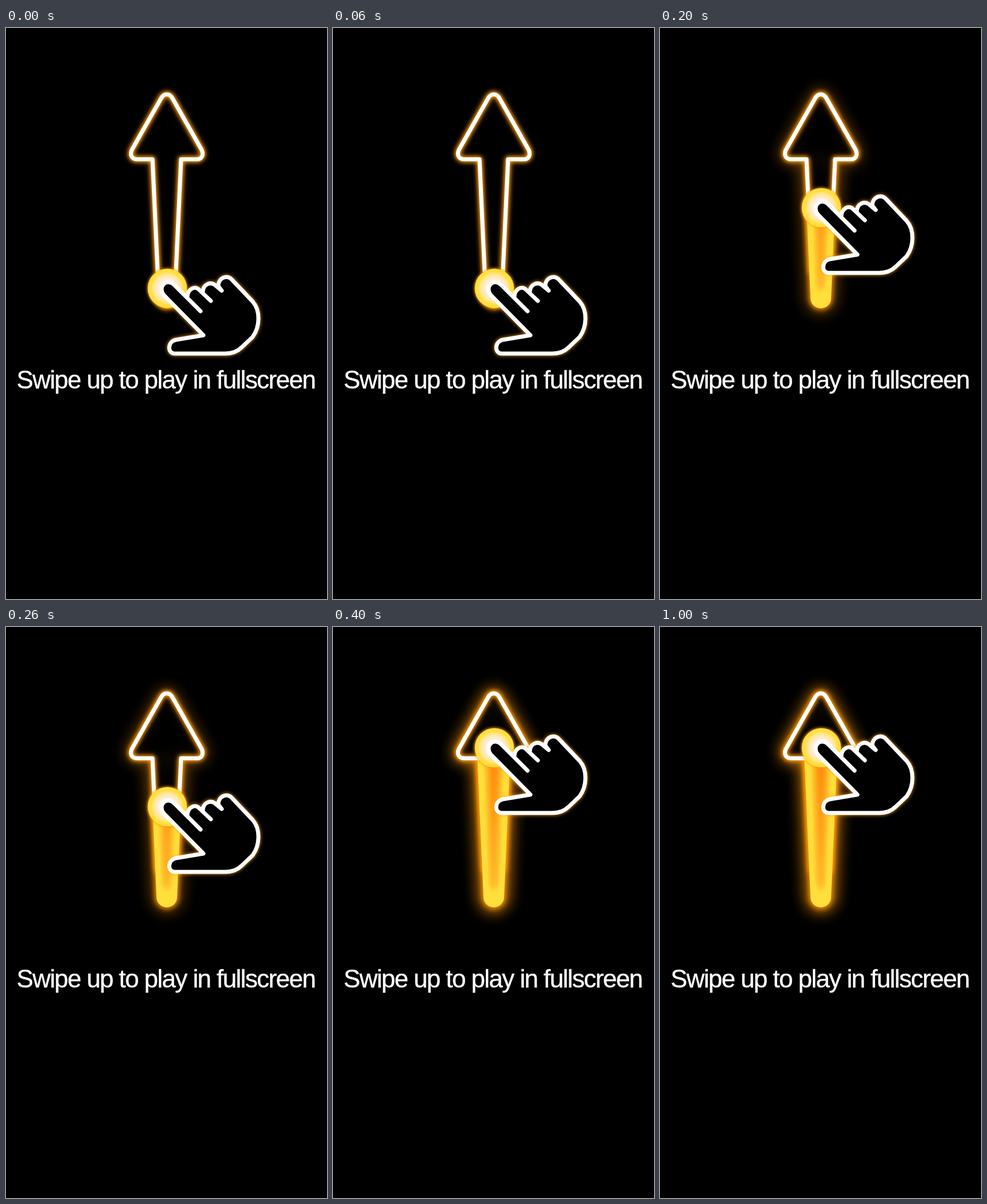
Write an HTML page that moves like this. It is 561 px wide and 998 px high and loops after 1.4 s.

```html
<!DOCTYPE html>
<html lang="en">
<head>
<meta charset="utf-8">
<title>Swipe up</title>
<style>
  html, body { margin: 0; width: 100%; height: 100%; overflow: hidden; background: #000; }
  svg { position: absolute; left: 0; top: 0; width: 561px; height: 998px; }
  path { stroke-linejoin: round; stroke-linecap: round; }
  .line { fill: none; stroke: #fff; stroke-width: 7; }
  .near { fill: none; stroke: #f90; stroke-width: 10; filter: url(#soft); opacity: .85; }
  .tight { fill: none; stroke: #ffa01a; stroke-width: 10; filter: url(#tight); opacity: .6; }
  text { font: 44px "Liberation Sans", Arial, sans-serif; letter-spacing: -1.6px; fill: #fff; stroke: #fff; stroke-width: .4; }

  .halo, .trail, .hand { animation: 1400ms step-end infinite; }
  .halo { animation-name: halo; }
  .trail { animation-name: trail; }
  .hand { animation-name: swipe; }

  @keyframes swipe {
    0% { transform: translateY(0); }
    7.14% { transform: translateY(-70px); }
    14.28% { transform: translateY(-141px); }
    21.42% { transform: translateY(-210px); }
    28.57%, 100% { transform: translateY(-244px); }
  }
  @keyframes trail {
    0% { clip-path: inset(470px 0 0); }
    7.14% { clip-path: inset(385px 0 0); }
    14.28% { clip-path: inset(314px 0 0); }
    21.42% { clip-path: inset(245px 0 0); }
    28.57%, 100% { clip-path: inset(233px 0 0); }
  }
  @keyframes halo {
    0% { opacity: 0; }
    7.14% { opacity: .28; }
    14.28% { opacity: .55; }
    21.42% { opacity: .8; }
    28.57%, 100% { opacity: 1; }
  }
</style>
</head>
<body>
<!-- arrow outline and text -->
<svg viewBox="0 0 561 998">
  <defs>
    <filter id="wide" filterUnits="userSpaceOnUse" x="0" y="0" width="561" height="998"><feGaussianBlur stdDeviation="12"/></filter>
    <filter id="soft" filterUnits="userSpaceOnUse" x="0" y="0" width="561" height="998"><feGaussianBlur stdDeviation="5"/></filter>
    <filter id="tight" filterUnits="userSpaceOnUse" x="0" y="0" width="561" height="998"><feGaussianBlur stdDeviation="2.5"/></filter>
    <path id="arrow" d="M297 425L306 229.5H334C342 229.5 346 222 342 213L291 123C286 113.5 276 113.5 271 123L220 213C216 222 220 229.5 229 229.5H256L265 425"/>
    <path id="stem" d="M252.5 231L263 472A18 18 0 0 0 299 472L309.5 231Z"/>
  </defs>
  <g class="halo">
    <g filter="url(#wide)" fill="none" stroke="#f90" stroke-width="20" opacity=".7">
      <use href="#arrow"/>
      <use href="#stem"/>
    </g>
    <use href="#arrow" fill="#000" opacity=".85"/>
  </g>
  <use href="#arrow" class="near"/>
  <use href="#arrow" class="tight"/>
  <use href="#arrow" class="line"/>
  <text x="18.5" y="630">Swipe up to play in fullscreen</text>
</svg>

<!-- filled stem, revealed below the finger -->
<svg class="trail" viewBox="0 0 561 998">
  <defs>
    <linearGradient id="core" gradientUnits="userSpaceOnUse" x1="0" y1="240" x2="0" y2="470">
      <stop stop-color="#ff8c0c"/>
      <stop offset=".5" stop-color="#ff9e18"/>
      <stop offset="1" stop-color="#ffb82a"/>
    </linearGradient>
  </defs>
  <use href="#stem" fill="#f90" stroke="#f90" stroke-width="5" filter="url(#soft)"/>
  <use href="#stem" fill="#ffdf3c"/>
  <path d="M264 225L273 452Q281 468 289 452L298 225Z" fill="#ffc42e" opacity=".7" filter="url(#tight)"/>
  <path d="M271 225L276 448Q281 460 286 448L291 225Z" fill="url(#core)" filter="url(#soft)"/>
</svg>

<!-- touch disc and hand -->
<svg class="hand" viewBox="0 0 561 998">
  <defs>
    <radialGradient id="disc">
      <stop offset=".4" stop-color="#fff3e4"/>
      <stop offset=".52" stop-color="#feebcc"/>
      <stop offset=".66" stop-color="#fee8a4"/>
      <stop offset=".76" stop-color="#ffe574"/>
      <stop offset=".82" stop-color="#ffe04a"/>
      <stop offset="1" stop-color="#ffdc34"/>
    </radialGradient>
    <path id="palm" d="M345 537L276 467C264 452 281 436 294 449L317 470C317 457 330 449 338 458L344 462C344 448 357 443 365 449L371 449C371 437 386 430 395 440L431 478C445 494 444 522 431 540L412 558Q401 569 383 569H294C283 568 282 548 297 545Z"/>
    <path id="hand" d="M340 495L294 449C281 436 264 452 276 467L345 537L297 545C282 548 282 568 294 569H383Q401 569 412 558L431 540C444 522 445 494 431 478L395 440C386 430 371 437 371 451L377 459M317 470C317 457 330 449 338 458L358 477M344 462C344 448 357 443 365 449L377 459"/>
  </defs>
  <use href="#hand" class="tight"/>
  <circle cx="282" cy="455" r="35" fill="#f90" filter="url(#tight)"/>
  <circle cx="282" cy="455" r="34.3" fill="url(#disc)"/>
  <use href="#palm" fill="#000"/>
  <use href="#hand" class="line"/>
</svg>
</body>
</html>
```
